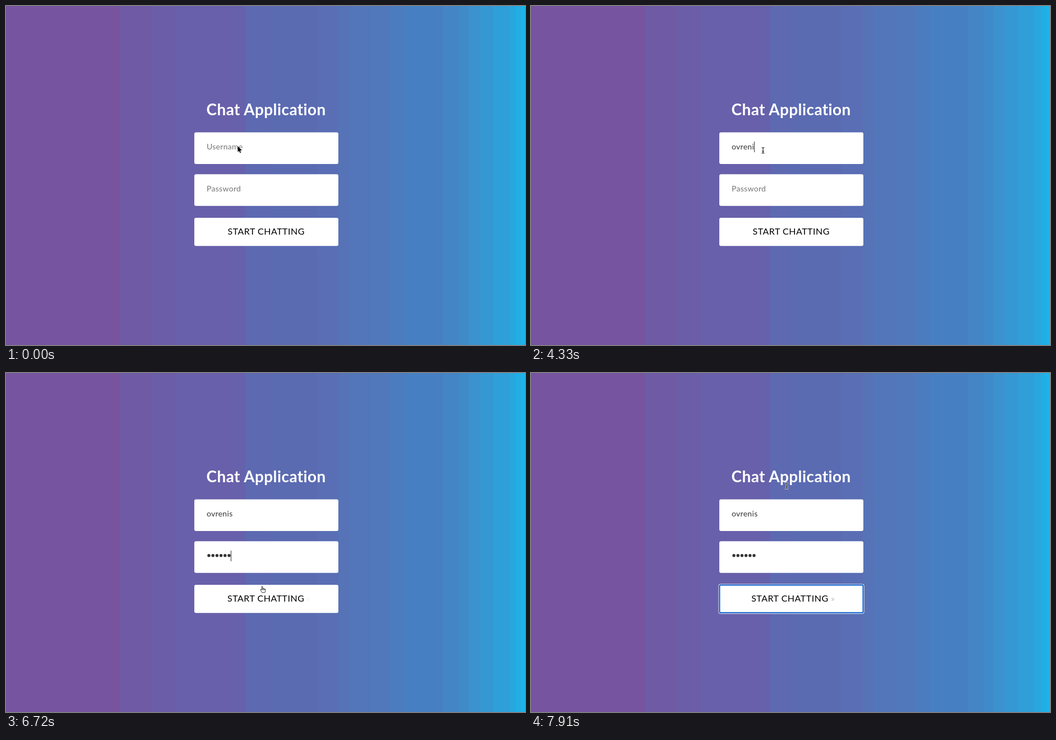
Animation, 926 px wide and 605 px high, one loop 8 s. Source, as an HTML page:

```html
<!DOCTYPE html>
<html lang="en">
<head>
<meta charset="utf-8">
<title>Chat Application</title>
<style>
  html, body { margin: 0; width: 100%; height: 100%; overflow: hidden; }
  svg { display: block; width: 100vw; height: 100vh; font-family: Lato, "Open Sans", sans-serif; }
  .box { fill: #fff; }
  .field { font-size: 14px; letter-spacing: .3px; fill: #333; }
  .hint { fill: #757575; }
  .title { font-size: 28px; font-weight: 700; letter-spacing: .4px; fill: #fff; }
  .label { font-size: 16px; letter-spacing: .5px; }
  .center { text-anchor: middle; }
  .caret { fill: #333; }
  .cursor { stroke-linejoin: round; stroke-linecap: round; }
</style>
</head>
<body>
<svg viewBox="0 0 926 605">
  <defs>
    <path id="beam" d="M-2 -5.2Q0 -5.2 0 -3.8Q0 -5.2 2 -5.2M0 -3.8V3.8M-2 5.2Q0 5.2 0 3.8Q0 5.2 2 5.2M-1.2 1.6H1.2"/>
  </defs>
  <g id="bands" shape-rendering="crispEdges"></g>

  <text class="title center" x="464.2" y="195">Chat Application</text>

  <rect class="box" x="336" y="225.5" width="257" height="56.5" rx="3"/>
  <rect class="box" x="336" y="300.2" width="257" height="56.5" rx="3"/>
  <rect class="box" x="336" y="378" width="257" height="50.3" rx="3"/>

  <g id="ring" fill="none">
    <rect x="335" y="377" width="259" height="52.3" rx="2.5" stroke="#fff"/>
    <rect x="336.5" y="378.5" width="256" height="49.3" rx="2" stroke="#1263cc" stroke-width="2"/>
  </g>

  <text id="userHint" class="field hint" x="358" y="256.3">Username</text>
  <text id="user" class="field" x="358" y="256.3"></text>
  <text id="passHint" class="field hint" x="358" y="331">Password</text>
  <g id="dots" fill="#333"></g>
  <rect id="caret" class="caret" width="1" height="19"/>

  <text id="label" class="label center" x="464.2" y="408.4">START CHATTING</text>
  <text id="chevron" class="label" y="408.4">»</text>

  <g id="cursor" class="cursor">
    <path id="arrow" d="M0 0V10.6L2.4 8.4L4 12.2L5.7 11.4L4.1 7.7H7.3Z" fill="#000" stroke="#fff" stroke-width=".8" paint-order="stroke"/>
    <g id="text" fill="none">
      <use href="#beam" stroke="#fff" stroke-width="2.2"/>
      <use href="#beam" stroke="#000" stroke-width="1"/>
    </g>
    <path id="hand" d="M-1.8 1V-4.4Q-1.8 -5.4 -.9 -5.4Q0 -5.4 0 -4.4V-1.2Q.9 -1.9 1.7 -.9Q2.6 -1.5 3.3 -.5Q4.7 -.9 4.7 .7V2.6Q4.7 4 3.8 5.8H-1.2Q-2 4 -3.6 2.3Q-4.8 .8 -3.6 .3Q-2.7 0 -1.8 1M0 -1.2V1M1.7 -.9V1M3.3 -.5V1" fill="#fff" stroke="#111" stroke-width=".85"/>
  </g>
</svg>
<script>
const LOOP = 8000, NAME = 'ovrenis', PITCH = 7.2;
const $ = id => document.getElementById(id);
const show = (id, on) => $(id).style.display = on ? '' : 'none';

const make = (parent, tag, attrs) => {
  const el = document.createElementNS('http://www.w3.org/2000/svg', tag);
  for (const key in attrs) el.setAttribute(key, attrs[key]);
  return $(parent).appendChild(el);
};

// left edge and colour of each background stripe
const bands = [
  [0, '#76549f'], [185, '#78539e'], [202, '#6e5aa5'], [260, '#6b5da8'],
  [302, '#6860aa'], [410, '#6661ab'], [427, '#5d69b1'], [470, '#5b6bb2'],
  [555, '#596eb4'], [592, '#5673b7'], [612, '#5375b9'], [648, '#5078bb'],
  [685, '#4b7cbf'], [713, '#4780c2'], [780, '#4385c5'], [808, '#3f8bca'],
  [826, '#3b92cf'], [845, '#3598d3'], [870, '#2f9fd9'], [898, '#28a6de'],
  [910, '#22ade4'], [919, '#1cb4e8']
];
bands.forEach(([x, fill]) => make('bands', 'rect', { x, width: 926 - x, height: 605, fill }));

const dots = [...NAME.slice(1)].map((_, i) =>
  make('dots', 'circle', { cx: 362 + i * PITCH, cy: 325.8, r: 2.7 }));

// every track lists [time, value...] and holds until its next row
const pointer = [
  [0, 'arrow', 413.5, 250], [150, 'arrow', 413.5, 254], [300, 'arrow', 413.5, 256],
  [2100, 'text', 414, 257.7],
  [4620, 'text', 415.5, 323], [4770, 'text', 416, 325.7],
  [6570, 'text', 428, 341], [6720, 'hand', 458, 386],
  [6870, 'hand', 469, 400], [7020, 'hand', 471.5, 404.5],
  [7620, 'hand', 468, 392], [7770, 'text', 460, 270], [7910, 'text', 456.3, 201.5]
];
const typed = [[0, 0], [3590, 1], [3740, 2], [3890, 3], [4040, 4], [4190, 5], [4330, 6], [4470, 7]];
const secret = [[0, 0], [5520, 1], [5670, 2], [5820, 3], [6120, 4], [6270, 5], [6420, 6]];
const focus = [
  [0, ''], [2240, 'user'], [2690, ''], [3290, 'user'],
  [4920, 'pass'], [5370, ''], [5520, 'pass'], [7020, '']
];
const hover = [[0, 0], [6720, .05], [6870, .5], [7020, .9], [7170, 1], [7770, .8], [7910, .26]];
const pressed = [[0, false], [7310, true]];

const at = (track, t) => track.findLast(row => row[0] <= t).slice(1);

function draw(t) {
  const [kind, x, y] = at(pointer, t);
  for (const id of ['arrow', 'text', 'hand']) show(id, id === kind);
  $('cursor').setAttribute('transform', `translate(${x} ${y})`);

  const [chars] = at(typed, t), [count] = at(secret, t), [field] = at(focus, t);
  $('user').textContent = NAME.slice(0, chars);
  show('userHint', !chars);
  show('passHint', !count);
  dots.forEach((dot, i) => dot.style.display = i < count ? '' : 'none');

  show('caret', field);
  const inUser = field === 'user';
  const width = inUser ? (chars ? $('user').getComputedTextLength() : 0) : count * PITCH;
  $('caret').setAttribute('x', Math.round(358 + width));
  $('caret').setAttribute('y', inUser ? 242 : 317);

  const [p] = at(hover, t);
  $('label').setAttribute('x', 464.2 - 9 * p);
  $('chevron').setAttribute('x', 536 - 4 * p);
  $('chevron').setAttribute('opacity', p);
  show('ring', at(pressed, t)[0]);
}

const start = performance.now();
function tick() {
  draw((performance.now() - start) % LOOP);
  requestAnimationFrame(tick);
}
tick();
</script>
</body>
</html>
```
